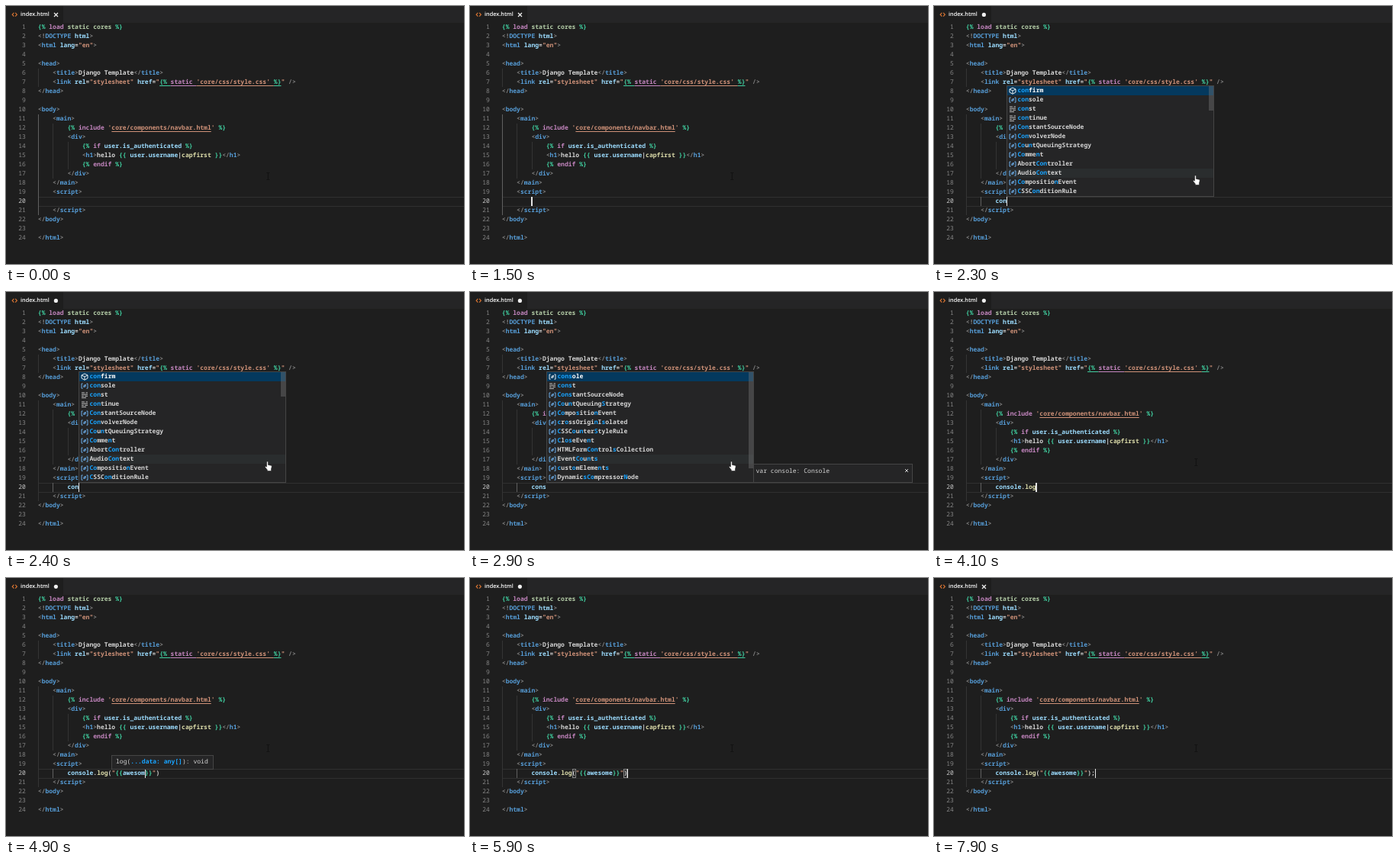
An HTML page for the animation above (8 s loop, 600 by 338 pixels).

```html
<!DOCTYPE html>
<html lang="en">
<head>
<meta charset="utf-8">
<title>Editor</title>
<style>
html, body { margin: 0; width: 100%; height: 100%; overflow: hidden; background: #1e1e1e; }
#stage {
  position: relative; width: 600px; height: 338px; overflow: hidden; background: #1e1e1e; color: #d4d4d4;
  font: 600 8.065px/12px "Noto Sans Mono", "DejaVu Sans Mono", monospace;
  font-variant-ligatures: none; text-rendering: geometricPrecision; white-space: pre;
}
#stage div, #stage svg { position: absolute; }
#code { left: 0; top: 0; }
.bar { left: 75px; top: 0; width: 525px; height: 22px; background: #252526; }
.title { left: 19px; top: 5px; color: #fff; font: 600 7.3px/12px "Open Sans", "Noto Sans", sans-serif; }
.num { width: 25.8px; text-align: right; color: #858585; font-weight: 500; }
.num.on { color: #c6c6c6; }
.current { left: 42px; top: 250px; width: 560px; height: 11px; border: 1px solid #303030; border-width: 1px 0; }
.guide { width: 1px; background: #343434; }
.guide.active { background: #606060; }
.p { color: #808080; } .t { color: #569cd6; } .a { color: #9cdcfe; } .s { color: #ce9178; }
.g { color: #40cfa0; } .k { color: #c586c0; } .f { color: #dcdcaa; } .n { color: #b5cea8; }
.link { text-decoration: underline; text-decoration-thickness: 1px; text-underline-offset: 1.5px; }
#typed { top: 250px; }
#caret { top: 250px; width: 1.3px; height: 12px; background: #e4e4e4; }
.match { box-sizing: border-box; top: 250px; width: 5px; height: 12px; border: 1px solid #888; }
.box { box-sizing: border-box; background: #252526; border: 1px solid #454545; }
#list { top: 104px; width: 272px; height: 146px; overflow: hidden; }
.row { left: 0; width: 270px; height: 12px; }
.row div { left: 13.5px; top: 0; }
.row svg { left: 1.5px; top: 1px; }
.row.hover { background: #2a2d2e; }
.row.picked { background: #04395e; color: #fff; }
.hit { color: #18a3ff; font-weight: 700; }
#thumb { right: 0; top: 0; width: 6px; background: rgba(121,121,121,.4); }
#info { left: 371px; top: 225px; width: 209px; height: 25px; font-weight: 500; }
#hint { top: 232px; width: 134px; height: 19px; font-weight: 500; }
#beam { opacity: .55; }
</style>
</head>
<body>
<div id="stage">
  <div class="bar"></div>
  <svg width="80" height="22" style="left:0;top:0" fill="none">
    <path d="M10.4 8.8 8.2 11.2l2.2 2.4M12.2 8.8l2.2 2.4-2.2 2.4" stroke="#e37933" stroke-width="1.1"/>
    <path id="close" d="M63 9l5 5M68 9l-5 5" stroke="#f0f0f0" stroke-width="1.2"/>
    <circle id="dirty" cx="65.4" cy="11.4" r="2.6" fill="#f0f0f0"/>
  </svg>
  <div class="title">index.html</div>
  <div class="current"></div>
  <div id="code"></div>
  <div id="typed"></div>
  <div id="open" class="match"></div>
  <div id="shut" class="match"></div>
  <div id="caret"></div>
  <div id="list" class="box"></div>
  <div id="info" class="box">
    <div style="left:2.5px;top:2.5px">var console: Console</div>
    <svg width="8" height="8" style="left:196px;top:4px"><path d="M2 2l4 4M6 2 2 6" stroke="#ccc"/></svg>
  </div>
  <div id="hint" class="box"><div style="left:5px;top:2px">log(<span class="hit">...data: any[]</span>): void</div></div>
  <svg id="beam" width="8" height="12" style="left:339px;top:217px"><path d="M2.5 1.5h1.3l.5.5.5-.5h1.3M4.3 2v8M2.5 10.5h1.3l.5-.5.5.5h1.3" fill="none" stroke="#050505"/></svg>
  <svg id="hand" width="12" height="15" style="left:338px;top:221px"><path d="M3.5 1.5Q4.6.4 5.4 1.7V5.4L9.4 6.3Q10.4 6.6 10.2 8L9.4 11.3V13.5H4.3V12L1.5 8.6Q1.2 7.2 2.6 7.4L3.5 8.2Z" fill="#fff" stroke="#222" stroke-width=".6"/></svg>
</div>
<script>
const $ = id => document.getElementById(id);
const CH = 4.839, LEFT = 41.8, ROW = 12, LOOP = 8000;
const colX = col => LEFT + col * CH;

function add(parent, cls, style = {}, text = '') {
  const el = document.createElement('div');
  el.className = cls;
  el.textContent = text;
  Object.assign(el.style, style);
  parent.append(el);
  return el;
}

function span(parent, cls, text) {
  const el = document.createElement('span');
  el.className = cls;
  el.textContent = text;
  parent.append(el);
}

// ^x switches the colour class; a capital letter also underlines.
const source = [
  '^g{% ^kload ^nstatic cores ^g%}',
  '^p<!^tDOCTYPE ^ahtml^p>',
  '^p<^thtml ^alang^w=^s"en"^p>',
  '',
  '^p<^thead^p>',
  '    ^p<^ttitle^p>^wDjango Template^p</^ttitle^p>',
  '    ^p<^tlink ^arel^w=^s"stylesheet" ^ahref^w=^s"^G{% ^Kstatic ^S\'core/css/style.css\' ^G%}^s" ^p/>',
  '^p</^thead^p>',
  '',
  '^p<^tbody^p>',
  '    ^p<^tmain^p>',
  '        ^g{% ^kinclude ^s\'^Score/components/navbar.html^s\' ^g%}',
  '        ^p<^tdiv^p>',
  '            ^g{% ^kif ^auser.is_authenticated ^g%}',
  '            ^p<^th1^p>^whello ^g{{ ^auser.username^w|^fcapfirst ^g}}^p</^th1^p>',
  '            ^g{% ^kendif ^g%}',
  '        ^p</^tdiv^p>',
  '    ^p</^tmain^p>',
  '    ^p<^tscript^p>',
  '',
  '    ^p</^tscript^p>',
  '^p</^tbody^p>',
  '',
  '^p</^thtml^p>'
];

source.forEach((line, i) => {
  const top = 22 + i * ROW + 'px';
  add($('code'), i === 19 ? 'num on' : 'num', { top, left: 0 }, i + 1);
  const el = add($('code'), '', { top, left: LEFT + 'px' });
  line.split('^').forEach((part, j) => {
    if (!j) return span(el, '', part);
    const key = part[0], low = key.toLowerCase();
    span(el, key === low ? low : low + ' link', part.slice(1));
  });
});

function guide(col, first, last) {
  return add($('code'), 'guide', {
    left: Math.round(colX(col)) + 'px', top: 10 + first * ROW + 'px', height: (last - first + 1) * ROW + 'px'
  });
}
guide(0, 6, 7);
guide(4, 12, 17);
guide(8, 14, 16);
const bodyGuide = guide(0, 11, 21), scriptGuide = guide(4, 20, 20);

// Brackets mark matched letters; a leading sign picks the icon.
const lists = {
  con: {
    thumb: 32,
    items: ['#[con]firm', '[con]sole', '=[con]st', '=[con]tinue', '[Con]stantSourceNode', '[Con]volverNode',
      '[Co]u[n]tQueuingStrategy', '[Co]mme[n]t', 'Abort[Con]troller', 'Audio[Con]text',
      '[Co]mpositio[n]Event', '[C]SSC[on]ditionRule']
  },
  cons: {
    thumb: 126,
    items: ['[cons]ole', '=[cons]t', '[Cons]tantSourceNode', '[Co]u[n]tQueuing[S]trategy', '[Co]mpo[s]itio[n]Event',
      '[c]r[o]ssOrigi[n]I[s]olated', '[C]SSC[o]u[n]ter[S]tyleRule', '[C]l[os]eEve[n]t',
      'HTMLForm[Con]trol[s]Collection', 'Event[Co]u[n]t[s]', '[c]ust[o]mEleme[n]t[s]', 'Dynamic[sCo]mpressor[N]ode']
  }
};

const icons = {
  '#': ['M5 1 9 3V7L5 9.3 1 7V3ZM1 3l4 2 4-2M5 5v4', '#b180d7'],
  '=': ['M1 2h4M6.5 2H9M1 4.2h8M1 6.4h3M5 6.4h4M1 8.6h6', '#d0d0d0'],
  '': ['M2.5 2H1v6.2h1.5M7.5 2H9v6.2H7.5M3.6 5.1l1.5-1.6 1.5 1.6-1.5 1.6ZM3.5 7 6.8 3', '#75beff']
};

function drawIcon(row, kind, picked) {
  const [d, color] = icons[kind];
  row.insertAdjacentHTML('beforeend',
    `<svg width="10" height="10"><path d="${d}" fill="none" stroke="${picked ? '#fff' : color}" stroke-width=".9"/></svg>`);
}

function showList(name, typed) {
  const box = $('list');
  box.replaceChildren();
  lists[name].items.forEach((item, i) => {
    const kind = /^[#=]/.test(item) ? item[0] : '';
    const row = add(box, 'row' + (i === 0 ? ' picked' : i === 9 ? ' hover' : ''), { top: i * ROW + 'px' });
    drawIcon(row, kind, i === 0);
    const label = add(row, '');
    let left = typed;
    item.slice(kind.length).split(/[\[\]]/).forEach((part, j) => {
      const hits = j % 2 ? Math.min(left, part.length) : 0;
      left -= hits;
      if (hits) span(label, 'hit', part.slice(0, hits));
      span(label, '', part.slice(hits));
    });
  });
  const thumb = add(box, '', { height: lists[name].thumb + 'px' });
  thumb.id = 'thumb';
}

// Each step overrides the state from its time on; tail is the text after the caret.
const steps = [
  [0, { text: '', tail: '', caret: 0, dirty: false, list: '', info: false, hint: 0, pair: false }],
  [300, { caret: .5 }], [400, { caret: 1 }],
  [800, { caret: .5 }], [900, { caret: 0 }],
  [1400, { caret: .5 }], [1500, { caret: 1 }],
  [1900, { caret: .5 }],
  [2000, { text: 'c', caret: 1, dirty: true }],
  [2100, { list: 'con' }],
  [2200, { text: 'co' }],
  [2300, { text: 'con' }],
  [2500, { text: 'cons', list: 'cons' }],
  [2700, { info: true }],
  [2800, { caret: .5 }], [2900, { caret: 0 }],
  [3100, { text: 'console', caret: 1, list: '', info: false }],
  [3200, { text: 'console.' }],
  [3300, { text: 'console.l' }],
  [3400, { text: 'console.lo' }],
  [3500, { text: 'console.log' }],
  [4200, { text: 'console.log(', tail: ')', pair: true, hint: 138 }],
  [4300, { text: 'console.log("', tail: '")', pair: false }],
  [4400, { text: 'console.log("{', tail: '}")' }],
  [4500, { text: 'console.log("{{', tail: '}}")' }],
  [4600, { text: 'console.log("{{aw' }],
  [4700, { text: 'console.log("{{awe' }],
  [4800, { text: 'console.log("{{awes' }],
  [4900, { text: 'console.log("{{awesom' }],
  [5000, { text: 'console.log("{{awesome', hint: 191 }],
  [5100, { text: 'console.log("{{awesome}}', tail: '")' }],
  [5500, { caret: .5 }], [5600, { caret: 0 }],
  [5800, { text: 'console.log("{{awesome}}"', tail: ')', caret: 1 }],
  [5900, { text: 'console.log("{{awesome}}")', tail: '', pair: true, hint: 0 }],
  [6100, { caret: .5 }], [6200, { caret: 0 }],
  [6300, { caret: .5 }], [6400, { caret: 1 }],
  [7100, { text: 'console.log("{{awesome}}");', pair: false }],
  [7800, { dirty: false }]
];

const colours = { log: 'f', '"': 's', '{': 's', '}': 's', '{{': 'g', '}}': 'g', '.': 'w', '(': 'w', ')': 'w', ';': 'w' };
const show = (id, on) => { $(id).style.display = on ? '' : 'none'; };
const place = (id, x) => { $(id).style.left = x + 'px'; };

function draw(s) {
  const line = s.text + s.tail, caretX = colX(8 + s.text.length);
  $('typed').replaceChildren();
  for (const word of line.match(/\{\{|\}\}|\w+|./g) || []) span($('typed'), colours[word] || 'a', word);
  place('typed', colX(8));
  place('caret', caretX - .3);
  $('caret').style.opacity = s.caret;
  // An empty line belongs to the outer block, a filled one to the script.
  bodyGuide.classList.toggle('active', !line);
  scriptGuide.classList.toggle('active', !!line);
  scriptGuide.style.display = line ? '' : 'none';
  show('dirty', s.dirty);
  show('close', !s.dirty);
  show('list', s.list);
  if (s.list) {
    showList(s.list, s.text.length);
    place('list', Math.round(caretX));
  }
  show('beam', !s.list);
  show('hand', s.list);
  show('info', s.info);
  show('hint', s.hint);
  place('hint', s.hint);
  show('open', s.pair);
  show('shut', s.pair);
  place('open', colX(8 + line.indexOf('(')));
  place('shut', colX(8 + line.indexOf(')')));
}

let shown = -1;
function frame() {
  const t = performance.now() % LOOP;
  const past = steps.filter(([at]) => at <= t);
  if (past.length !== shown) {
    shown = past.length;
    draw(Object.assign({}, ...past.map(step => step[1])));
  }
  requestAnimationFrame(frame);
}
frame();
</script>
</body>
</html>
```
